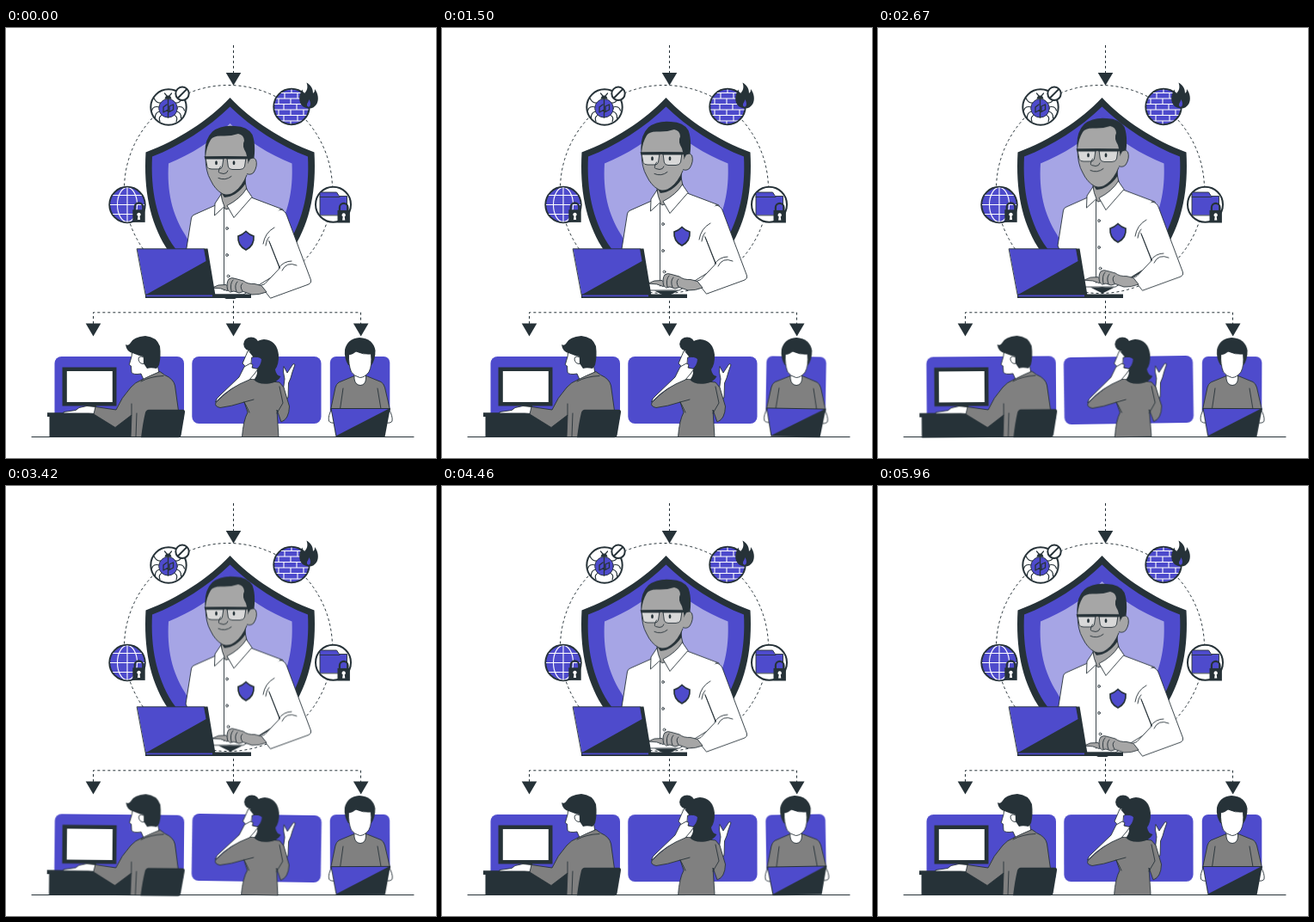
These frames come from a looping animation (500 px wide and 500 px high, 6 s). An HTML page without scripts:

```html
<!DOCTYPE html>
<html lang="en">
<head>
<meta charset="utf-8">
<title>Security team</title>
<style>
  html, body { margin: 0; width: 100%; height: 100%; overflow: hidden; background: #fff; }
  svg { display: block; width: 100%; height: 100%; }
  .ink { fill: #263238; }
  .blue { fill: #4e4bcc; }
  .pale { fill: #a6a5e5; }
  .skin { fill: #a6a6a6; }
  .grey { fill: #808080; }
  .white { fill: #fff; }
  .line { fill: none; }
  .ol, .line { stroke: #263238; stroke-width: .9; stroke-linejoin: round; stroke-linecap: round; }
  .ring { stroke: #263238; stroke-width: 2; }
  .mesh { fill: none; stroke: #fff; stroke-width: 1.1; }
  .dash { fill: none; stroke: #263238; stroke-width: 1; stroke-dasharray: 3 3; }

  .float { animation: float 6s linear infinite; }
  .wind { animation: wind 3s linear infinite; }
  .desk { transform-origin: 128px 417px; }
  .caller { transform-origin: 291px 418px; animation-duration: 1.5s; }
  .typist { transform-origin: 412px 418px; animation-duration: 6s; }
  @keyframes float { 50% { transform: translateY(-10px); } }
  @keyframes wind {
    0%, 100% { transform: rotate(0deg); }
    25% { transform: rotate(1deg); }
    75% { transform: rotate(-1deg); }
  }
</style>
</head>
<body>
<svg viewBox="0 0 500 500">
  <defs>
    <path id="arrow" class="ink" d="M-8.8 0H8.8L0 14.8Z"/>
    <g id="lock">
      <path class="line" style="stroke-width:2.2" d="M-4.8 1V-3.2A4.8 4.8 0 0 1 4.8 -3.2V1"/>
      <rect class="ink" x="-7.2" y="0" width="14.4" height="14.6"/>
      <path class="white" d="M0 3.4a2.1 2.1 0 0 1 1 4l.6 4.2h-3.2l.6-4.2a2.1 2.1 0 0 1 1-4Z"/>
    </g>
    <clipPath id="globe"><circle cx="141" cy="205.5" r="20"/></clipPath>
    <clipPath id="wall"><circle cx="332" cy="91.5" r="20"/></clipPath>
    <clipPath id="above"><path d="M0 0H500V314.4H0Z"/></clipPath>
  </defs>

  <!-- links -->
  <path class="dash" d="M264.5 20V52M264.5 317V344M101.5 344V330.8H412.5V344"/>
  <circle class="dash" cx="258.5" cy="187.5" r="121"/>
  <use href="#arrow" x="264.5" y="52"/>
  <use href="#arrow" x="101.5" y="343.6"/>
  <use href="#arrow" x="264.5" y="343.6"/>
  <use href="#arrow" x="412.7" y="343.6"/>

  <!-- shield -->
  <path class="ink" d="M260.5 81C286 108 322 131 358.500 144.500C361 188 354 224 335 255C318 281 296 294 260.500 302C225 294 203 281 186 255C167 224 160 188 162.500 144.500C199 131 235 108 260.500 81Z"/>
  <path class="blue" d="M260.500 91.500C286 116 318 137 351 149.500C353 188 346 222 328 251C312 274 291 287 260.500 294C230 287 209 274 193 251C175 222 168 188 170 149.500C203 137 235 116 260.500 91.500Z"/>
  <path class="pale" d="M260.500 111C280 131 306 147 332.500 157.500C334 190 328 216 313 240C302 260 286 276 260.500 284C235 276 219 260 208 240C193 216 187 190 189 157.500C215 147 241 131 260.500 111Z"/>

  <!-- bug -->
  <circle class="white ring" cx="189" cy="92" r="20.700"/>
  <path class="line" style="stroke-width:1.200" d="M180.500 87Q175 88 172 81.500M178.500 92Q171 90 169.500 96M179 97Q173 98 173.500 105M182 101Q176.500 103 179 109M196.500 87Q202 88 205 81.500M198.500 92Q206 90 207.500 96M198 97Q204 98 203.500 105M195 101Q200.500 103 198 109M187 79L184.500 76M190 79L192.500 76"/>
  <circle class="blue ol" cx="188.500" cy="93.300" r="10.800"/>
  <path class="ink" d="M184.500 82.800Q185 78.500 188.500 78.500Q192 78.500 192.500 82.800Q188.500 81.500 184.500 82.800Z"/>
  <path class="line" style="stroke-width:1.300" d="M188.500 83V104M188.500 95L183 98V92L187 89M189 98L194.500 95V89L190 91V97"/>
  <circle class="white ring" cx="205" cy="76.300" r="7.700"/>
  <path class="ring" d="M199.600 81.700L210.400 70.900"/>

  <!-- firewall -->
  <circle class="blue ring" cx="332" cy="91.500" r="20.700"/>
  <path class="mesh" clip-path="url(#wall)" d="M310 75.500H354M310 82H354M310 88.500H354M310 95H354M310 101.500H354M310 108H354M332 70v5.500M324 75.500V82M339 75.500V82M317 82v6.500M331 82v6.500M346 82v6.500M323 88.500V95M338 88.500V95M317 95v6.500M331 95v6.500M346 95v6.500M323 101.500V108M339 101.500V108M331 108v5"/>
  <path class="ink" d="M349.500 63.500C354 66 357 70 357 76Q359.500 74 359 71C363 76 364 83 361.500 88Q358 94 351.500 93.500Q343 92.500 341.500 85C340.500 79 343 74 344.500 71.500Q345 75 347 76C351 72 351 68 349.500 63.500Z"/>
  <path class="blue" d="M352.300 83C354.300 86 354.500 89 353.300 91Q351.500 92.500 350 90.500Q349.500 88 351 86.500Q352 85 352.300 83Z"/>

  <!-- globe -->
  <circle class="blue ring" cx="141" cy="205.500" r="20.700"/>
  <g class="mesh" clip-path="url(#globe)">
    <ellipse cx="141" cy="205.500" rx="11.500" ry="20"/>
    <path d="M141 185V226M120 205.500H162M123 194.500H159M123 216.500H159"/>
  </g>
  <use href="#lock" x="154.500" y="211.300"/>

  <!-- folder -->
  <circle class="white ring" cx="380.500" cy="205.300" r="20.500"/>
  <path class="blue ol" d="M365 217.500V191H384.500L387.500 195.500H396.500V217.500Z"/>
  <path class="line" d="M365 196.500H388"/>
  <use href="#lock" x="392.700" y="211.900"/>

  <!-- engineer -->
  <g clip-path="url(#above)">
  <g class="float">
    <path class="ink" d="M247 310.500H275L261 317.500Z"/>
    <path class="white ol" d="M246 205L219 217Q216 218 215.500 221L209 262L230 310H276L318 284L322 211L285 197Z"/>
    <path class="white ol" d="M319 211Q324.500 212 326.500 218L341 257L354.500 293Q355.500 296.500 352 298L307.500 314.200L296 299.500L301 297.500L318.500 279L306 248Q304 220 319 211Z"/>
    <path d="M305 246Q302 216 318 212L323 214L316 262Z" class="white"/>
    <path class="line" d="M306 248L318 279M299 251Q301 238 312 232M302 253Q303 246 306 243M321 282Q326 271 338 276M317 279Q323 271 332 271"/>
    <path class="skin ol" d="M250 190L250.500 202L255.500 211L272 206L280 188L277 174Z"/>
    <path class="ink" d="M250 191Q262 195 271 184L279 172L278.500 181Q268 196 254 197Z"/>
    <path class="skin ol" d="M280 153Q286 148 290.500 153Q293 160 288 168Q284 172 279 169Z"/>
    <path class="ink" d="M231.500 150Q230 130 240 120.500Q250 112.500 266 114Q281 114.500 286.500 124Q290.500 135 288.500 151L284 152.500L280 160L276 158L233 152Z"/>
    <path class="skin" d="M232 150Q233 138 238 130Q241 125 251 125.500Q261 126 270 123Q276.500 124 277 131Q274 137 279 145L281.500 155L280 171Q275 184 266 190.500Q259 196 252 193Q243 188 238 177Q233 167 232 150Z"/>
    <path class="line" d="M232 150Q232 167 238 177Q243 188 252 193Q259 196 266 190.500Q275 184 280 171"/>
    <path fill="#d8d8d8" class="ring" style="stroke-width:.9" d="M232 151H253L251.500 161Q251 164 247 164H239Q235 164 234 161.500ZM257 151H279L277.500 161Q276.500 164.500 272 164.500H263Q259 164.500 258.300 161Z"/>
    <path class="ink" d="M230.500 149.300Q255 148.500 280.500 149.300L282 151.500L279 152.500H257L255 151.800L253 152.500H231.500Z"/>
    <ellipse class="ink" cx="244.500" cy="156.700" rx="1.400" ry="2.500"/>
    <ellipse class="ink" cx="265" cy="156.700" rx="1.400" ry="2.500"/>
    <path class="line" d="M249.500 161Q245.500 168 248.500 168.500L253 169.500Q257 169.500 258 166M247 174.500Q255 178 262 172.500"/>
    <path class="white ol" d="M250 193.500L243 204L242.500 218L254 207.500Q251 201 250 193.500Z"/>
    <path class="white ol" d="M279.500 187L286 196.500L265 220.500L257 206.500Q272 199 279.500 187Z"/>
    <path class="line" d="M253.500 209V305"/>
    <g class="white ol">
      <circle cx="257" cy="233" r="1.400"/><circle cx="257" cy="264" r="1.400"/><circle cx="258.500" cy="288.500" r="1.400"/>
    </g>
    <path class="blue" stroke="#263238" stroke-width="1.700" d="M279 236.500Q283 240.500 288 242Q289 253 279 258Q269 253 270 242Q275 240.500 279 236.500Z"/>
    <path class="skin ol" d="M240 302L247 299L256 298.500L261 304L257 305.500L250 303Z"/>
    <path class="skin ol" d="M257.500 304Q256 296 259 292Q262 289.500 267 291.500L276 294Q281 298 289 297.500L297 299.500L303 307Q294 310.500 286 310L276 306.500L271 308L265 306L261 307Z"/>
    <path class="line" d="M262 306Q260 297 264 293M268 306.500Q265 299 269 295M275 306Q271 300 275 297"/>
  </g>
  </g>

  <!-- laptop -->
  <path class="ink" d="M230 256.500H234.500L243.500 311H236ZM162 309.600H285V313.900H162Z"/>
  <path class="blue ol" d="M152.500 256.800H230.500L240 310H162.500Z"/>
  <path class="ink" d="M163 310L233.500 270.500L241.500 311Z"/>
  <path class="blue" d="M163 310.600H240V312.300H163Z"/>

  <path class="line" style="stroke-width:1.100" d="M30 475.500H474"/>

  <!-- desk worker -->
  <g class="wind desk">
    <rect class="blue" x="56.500" y="382" width="150.500" height="78" rx="8"/>
    <path class="ink" d="M93 437H105V448H93ZM65.500 394.500H128.500V439.500H65.500Z"/>
    <rect class="white" x="70.800" y="399" width="53" height="36"/>
    <path class="ink" d="M48 447.300H146V476H50.500V452H48Z"/>
    <path class="white ol" d="M104 440.500L94 439.500L85 441.500L81 444.500L67 446.500V448L96 448L104 448.500Z"/>
    <path class="white ol" d="M147 375L146 382L143.300 391.500L145.500 393L146 400.500Q148 403.500 157 402L161 411L178 402L174 378Z"/>
    <path class="grey ol" d="M158 409Q168 404 179 399.500L184.500 403.500Q195 408 196.500 416L200.500 445L198 475.500H145L146 450L127 464.500L102 449L104 440.500L128 444Q134 430 145 418Q150 412 158 409Z"/>
    <path class="line" d="M146 450V437M157 411Q168 405 183 404.500M151 475L152 448"/>
    <path class="ink" d="M147 378Q140 376 139 368Q142 370 144.500 366.500Q148 359 162 358Q175 359 179 370Q180.500 382 178 392L175 396Q168 394.500 164 396L160 390L159.500 382L155 381Z"/>
    <path class="white ol" d="M160 383Q155 380 154 385Q155 391 160 390.500Z"/>
    <path class="ink" d="M166 443.800H205.500Q208.500 444 208 447L203.500 474Q203 476.300 200.500 476.300H157Q159 460 162 447Q163 444 166 443.800Z"/>
  </g>

  <!-- caller -->
  <g class="wind caller">
    <rect class="blue" x="216.300" y="382" width="150.200" height="78" rx="8"/>
    <path class="white ol" d="M322 424L324 408L322.500 400L323 393.500L327 401L334 390.500L336 391.500L333 400L331 407L328.500 413L328 430L322 432Z"/>
    <path class="white ol" d="M281 376L275 390L277.500 392.500L277 402L283 405.500L284 413L302 414V380Z"/>
    <path class="grey ol" d="M275 411.500Q283 407 290 409L318 412L323 418L329.500 440Q329 455 320 458L315 444L317 475.500H274.500Q276 456 281 447L277 435Q262 440 249 441.500Q242 440 244 435.500Q258 421 275 411.500Z"/>
    <path class="line" d="M318 417L322 436L315 448M277 435L288 432M283 447Q280 440 277 435"/>
    <ellipse class="ink" cx="285" cy="367.500" rx="8.800" ry="8"/>
    <path class="ink" d="M283 377Q288 363 300 362Q315 363 317 380Q317.500 391 313 397Q314 404 319.500 405Q316 412 306 413.500Q293 415 288.500 409Q294 402 291 394L287 382Z"/>
    <path class="blue ol" d="M286 383Q294 381 297.500 385Q297 393 291 397L285 394Z"/>
    <path class="white ol" d="M243.500 434.500Q245 430 249 427L271 406L277 394L284 390L287 391.500L286 395L293 396.500L289 402L283 409Q260 418 246 433Z"/>
  </g>

  <!-- typist -->
  <g class="wind typist">
    <rect class="blue" x="376.800" y="382" width="69.500" height="78" rx="7"/>
    <path class="white ol" d="M379 443Q374 451 375.500 457Q377 460 384 459ZM445 443Q450 451 449 457Q448 460 440 459Z"/>
    <path class="grey ol" d="M404 405L387 412Q384 414 383 418L377.500 444H446.500L440.500 418Q439 413 436 411.500L420 405Z"/>
    <path class="line" d="M392 419L388.500 443M432 419L436 443"/>
    <path class="white ol" d="M405 398V408Q406 415 412 415.500Q418 415 418.500 408V398Z"/>
    <path class="ink" d="M398 392Q393 384 394 374Q397 361 411 360Q427 361 429.500 375Q429.500 386 425 392Z"/>
    <path class="white ol" d="M398.500 380Q404 379 407 376Q415 380 424.500 379Q426 392 422 400Q417 406.500 411.500 406.500Q405 405 401.500 400Q398 391 398.500 380Z"/>
    <path class="ink" d="M377.500 442H446.800L440.500 475.500H383.500Z"/>
    <path class="blue" d="M378.600 443H444.500L384.300 474Z"/>
  </g>
</svg>
</body>
</html>
```
